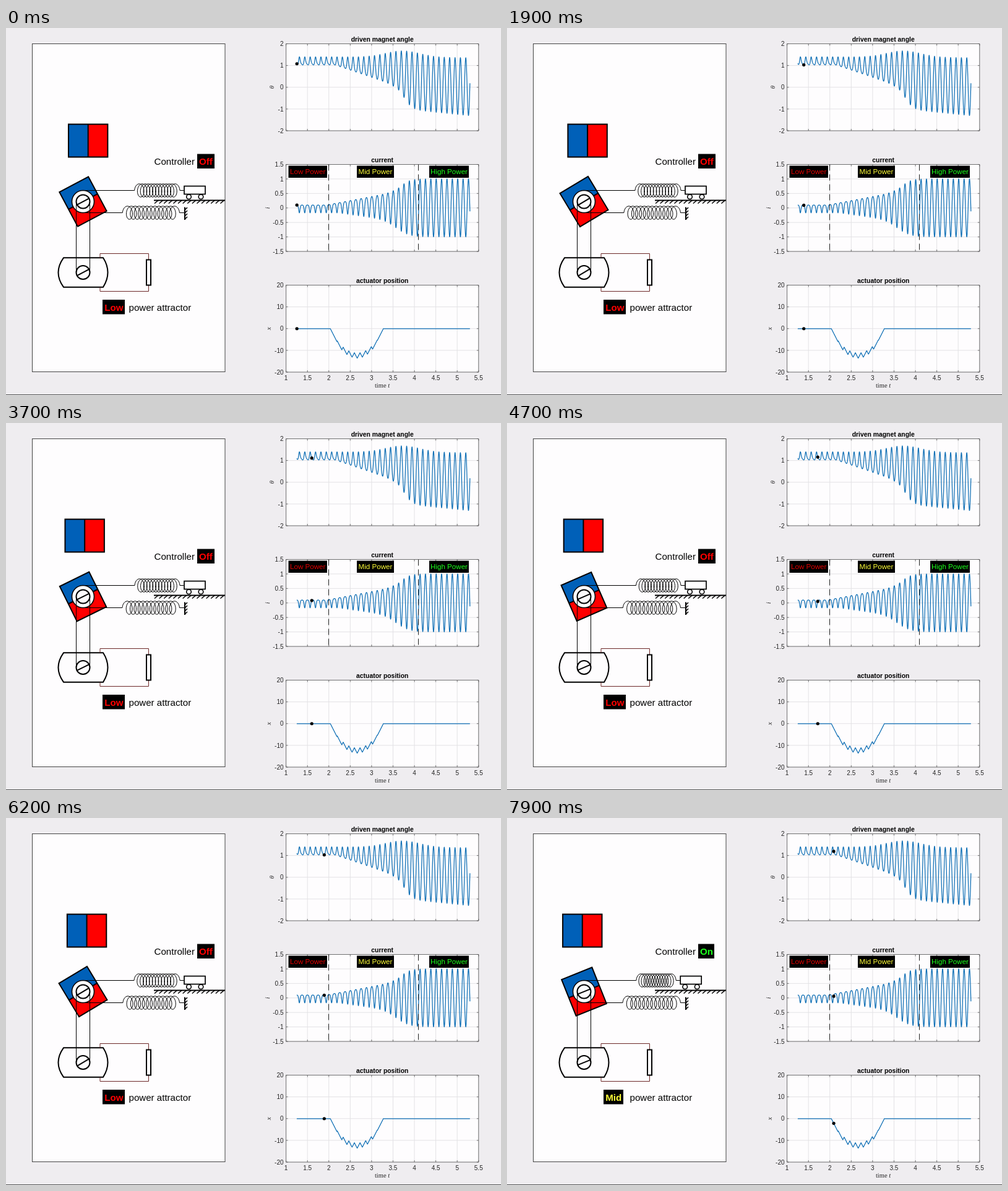
Recreate the animation shown at these times as an HTML page. Size 800x593 px, loop 8 s.

```html
<!DOCTYPE html>
<html lang="en">
<head>
<meta charset="utf-8">
<title>Magnet generator</title>
<style>
html, body { margin: 0; width: 100%; height: 100%; overflow: hidden; background: #efedf0; }
svg { display: block; width: 800px; height: 593px; }
text { font-family: "Liberation Sans", Arial, sans-serif; font-size: 10px; fill: #262626; }
.bold { font-weight: bold; }
.big { font-size: 15.1px; fill: #000; }
.tag { font-size: 11.6px; }
.math { font: 10.5px "Liberation Serif", "Times New Roman", serif; }
.it { font-style: italic; }
.mid { text-anchor: middle; }
.end { text-anchor: end; }
.thin, .thick, .hatch, .grid, .curve { fill: none; stroke: #000; stroke-width: 1; }
.thick { stroke-width: 2; }
.hatch { stroke-width: 1.6; }
.grid { stroke: #e3e2e5; }
.curve { stroke: #0f6fb5; stroke-width: 1.25; stroke-linejoin: round; }
.wire { fill: none; stroke: #6d2828; }
.white { fill: #fefdfe; }
</style>
</head>
<body>
<svg viewBox="0 0 800 593">
  <rect class="white" x="42.5" y="25.5" width="311.5" height="530" stroke="#444"/>
  <path d="M0 592.5H800" stroke="#555"/>
  <g id="charts"></g>

  <g id="driver">
    <path fill="#0060b8" d="M-31.7 155.5h31.7v53h-31.7z"/>
    <path fill="#f00" d="M0 155.5h31.7v53H0z"/>
    <path class="thick" d="M-31.7 155.5h63.4v53h-63.4zM0 155.5v53"/>
  </g>

  <path class="thick white" d="M93 371.3H157Q172 395 157 418.7H93Q76 395 93 371.3z"/>
  <path class="wire" d="M152 371V364.5H230.5V374M152 419V425.5H230.5V416"/>
  <rect class="thick white" x="227" y="374.5" width="7" height="41"/>

  <g id="rotor">
    <path fill="#0060b8" d="M-26.5 -31.5h53V0h-53z"/>
    <path fill="#f00" d="M-26.5 0h53v31.5h-53z"/>
    <path class="thick" d="M-26.5 -31.5h53v63h-53zM-26.5 0h53"/>
  </g>
  <circle class="white" cx="124.5" cy="280.5" r="18" stroke="#000" stroke-width="1.6"/>
  <path class="thin" d="M113.5 281V395M135.5 281V395"/>
  <circle class="thick white" cx="124.5" cy="280.5" r="11"/>
  <circle class="thick white" cx="124.5" cy="395" r="11"/>
  <path class="thick slot" d="M-11 0H11"/>
  <path class="thick slot" d="M-11 0H11"/>

  <path id="springs" class="thin"/>
  <g id="cart">
    <rect class="white" x="0" y="255.5" width="34" height="13" stroke="#000" stroke-width="1.7"/>
    <circle class="white" cx="7.5" cy="272.7" r="3.8" stroke="#000" stroke-width="1.6"/>
    <circle class="white" cx="27" cy="272.7" r="3.8" stroke="#000" stroke-width="1.6"/>
  </g>
  <path id="hatch" class="hatch"/>
  <path class="thick" d="M239 278.5H354M289 289.5V310"/>

  <text class="big" x="239.5" y="220.8">Controller</text>
  <rect id="stateBox" x="309" y="203.5" height="23.5"/>
  <text id="state" class="big bold" x="312" y="220.8"></text>
  <rect id="powerBox" x="156" y="439" height="23.5"/>
  <text id="power" class="big bold" x="159.3" y="456.8"></text>
  <text class="big" x="198.5" y="456.8">power attractor</text>

  <g id="dots"><circle r="2.6"/><circle r="2.6"/><circle r="2.6"/></g>
</svg>
<script>
const $ = q => document.querySelector(q);
const START = 1.25, END = 5.3;
const px = t => 452.6 + (t - 1) * 69.15;
const phase = t => 50 * t + 0.36;
const clamp = (v, lo, hi) => Math.min(hi, Math.max(lo, v));
const sigmoid = v => 1 / (1 + Math.exp(-v));

// Simulation time: a slow start with a short pause, then a steady pace
const clock = ms => ms < 1100 ? 1.2535 + 4.9e-5 * Math.min(ms, 900) : 1.2985 + 1.1655e-4 * (ms - 1100);

// Periodic pulse from 0 to 1; larger k makes it narrower
const pulse = (a, k) =>
  (Math.exp(k * (Math.cos(a) - 1)) - Math.exp(-2 * k)) / (1 - Math.exp(-2 * k));
const sharpness = t => clamp(1.5 - 0.73 * (t - 2), 0.05, 1.5);
const beat = t => phase(t) - 2.78 - 0.2 * sharpness(t);

function angle(t) {
  const k = sharpness(t);
  const hi = 1.4 + 0.28 * Math.exp(-(((t - 3.72) / 0.55) ** 2)) - 0.04 * sigmoid(4 * (t - 4.5));
  const lo = 1.045 - 0.68 * clamp(t - 2.13, 0, 1.4) - 1.05 * sigmoid(11 * (t - 3.76)) - 0.2 * Math.max(0, t - 3.53);
  return lo + (hi - lo) * pulse(beat(t), k)
    - 0.027 * k * Math.sin(phase(t)) + 0.055 * Math.exp(-60 * (t - START));
}

function current(t) {
  const hi = 0.1 + 0.28 * clamp(t - 1.95, 0, 1.55) + 0.47 * sigmoid(10 * (t - 3.7));
  const lo = -0.17 - 0.2 * clamp(t - 2.2, 0, 1.3) - 0.57 * sigmoid(7 * (t - 3.6));
  return hi - (hi - lo) * pulse(beat(t), 1.2 * sharpness(t));
}

// The actuator runs at constant speed; its share of outward motion shrinks over time
function position(t) {
  const step = 0.002;
  let x = 0;
  for (let s = 2.035; s < t; s += step) {
    const back = Math.cos(phase(s) - 3.1) > 2.1 * (2.66 - s);
    x = Math.min(0, x + (back ? 1 : -1) * 38.7 * Math.min(step, t - s));
    if (x === 0) break;
  }
  return x;
}

const charts = [
  { title: "driven magnet angle", name: "θ", nx: 433, top: 25.5, max: 2, step: 1, f: angle },
  { title: "current", name: "i", nx: 426, top: 220.5, max: 1.5, step: 0.5, f: current },
  { title: "actuator position", name: "x", nx: 428, top: 415.5, max: 20, step: 10, f: position },
];
const H = 140.5;
const py = (c, v) => c.top + H / 2 * (1 - v / c.max);
const text = (x, y, cls, s, extra = "") => `<text x="${x}" y="${y}" class="${cls}" ${extra}>${s}</text>`;

function drawChart(c) {
  const bottom = c.top + H, mid = c.top + H / 2;
  let grid = "", ticks = "", labels = "", line = "";
  for (let t = 1; t <= 5.5; t += 0.5) {
    const x = px(t);
    grid += `M${x} ${c.top}V${bottom}`;
    ticks += `M${x} ${c.top}v3M${x} ${bottom}v-3`;
    if (c.f === position) labels += text(x, 569, "mid", t);
  }
  for (let v = -c.max; v <= c.max; v += c.step) {
    const y = py(c, v);
    grid += `M452.6 ${y}H763.8`;
    ticks += `M452.6 ${y}h3M763.8 ${y}h-3`;
    labels += text(448.5, y + 3.7, "end", v);
  }
  for (let t = START; t <= END; t += 0.004) line += `${line ? "L" : "M"}${px(t).toFixed(2)} ${py(c, c.f(t)).toFixed(2)}`;
  return `<rect class="white" x="452.6" y="${c.top}" width="311.2" height="${H}"/>
    <path class="grid" d="${grid}"/>
    <path class="thin" style="stroke:#555;stroke-width:.8" d="${ticks}M452.6 ${c.top}h311.2v${H}h-311.2z"/>
    <path class="curve" d="${line}"/>${labels}
    ${text(608.2, c.top - 4, "bold mid", c.title, 'style="font-size:10.4px;fill:#000"')}
    ${text(c.nx, mid, "math it mid", c.name, `transform="rotate(-90 ${c.nx} ${mid})"`)}`;
}

const tag = (x, w, color, s) =>
  `<rect x="${x}" y="222.5" width="${w}" height="19.5"/>` + text(x + w / 2, 236.4, "tag mid", s, `style="fill:${color}"`);

$("#charts").innerHTML = charts.map(drawChart).join("")
  + '<path d="M521.5 220.5V361M666.5 220.5V361" stroke="#222" stroke-dasharray="10 6"/>'
  + tag(456.5, 62.5, "#e00000", "Low Power")
  + tag(567, 60, "#ffff38", "Mid Power")
  + tag(684, 64, "#1cff1c", "High Power")
  + text(608, 580.5, "math mid", 'time <tspan class="it">t</tspan>');

// Hatching below the floor and beside the wall
let hatch = "";
for (let x = 240; x < 350; x += 7.6) hatch += `M${x} 283.5l6 -5`;
for (let y = 294; y < 312; y += 5) hatch += `M289 ${y}l4 -4`;
$("#hatch").setAttribute("d", hatch);

function coil(x0, x1, y) {
  const r = 6.5, turns = 12.5, pitch = (x1 - x0 - 2 * r) / turns;
  let d = "";
  for (let a = 0; a <= turns; a += 1 / 24) {
    const w = a * 2 * Math.PI;
    d += `L${(x0 + r - r * Math.cos(w) + pitch * a).toFixed(2)} ${(y - 10.7 * Math.sin(w)).toFixed(2)}`;
  }
  return d;
}

function badge(id, word, color, width) {
  const label = $("#" + id);
  label.textContent = word;
  label.style.fill = color;
  $(`#${id}Box`).setAttribute("width", width);
}

const move = (el, x, y, turn = 0) => el.setAttribute("transform", `translate(${x} ${y}) rotate(${turn})`);

function draw(ms) {
  const t = clock(ms), th = angle(t);
  const turn = th * 180 / Math.PI - 90;
  const cartX = 288 + 3.6 * position(t);
  const shift = 12 * (th - 1.1);

  move($("#driver"), 124.5 + 8.35 * Math.cos(phase(t)), 0);
  move($("#rotor"), 124.5, 280.5, turn);
  document.querySelectorAll(".slot").forEach((s, i) => move(s, 124.5, i ? 395 : 280.5, turn));
  move($("#cart"), cartX, 0);
  $("#springs").setAttribute("d",
    "M124.5 262.5" + coil(207.8 + shift, cartX - 7, 262.5) + `H${cartX}`
    + "M124.5 298.5" + coil(188 - shift, 280.5, 298.5) + "H289");

  const on = t >= 2;
  badge("state", on ? "On" : "Off", on ? "#1cff1c" : "#f00", on ? 26 : 28);
  badge("power", on ? "Mid" : "Low", on ? "#ffff38" : "#f00", on ? 32 : 36);
  charts.forEach((c, i) => move($("#dots").children[i], px(t), py(c, c.f(t))));
}

function tick() {
  draw(Math.floor(performance.now() % 8000 / 100) * 100);
  requestAnimationFrame(tick);
}
tick();
</script>
</body>
</html>
```
